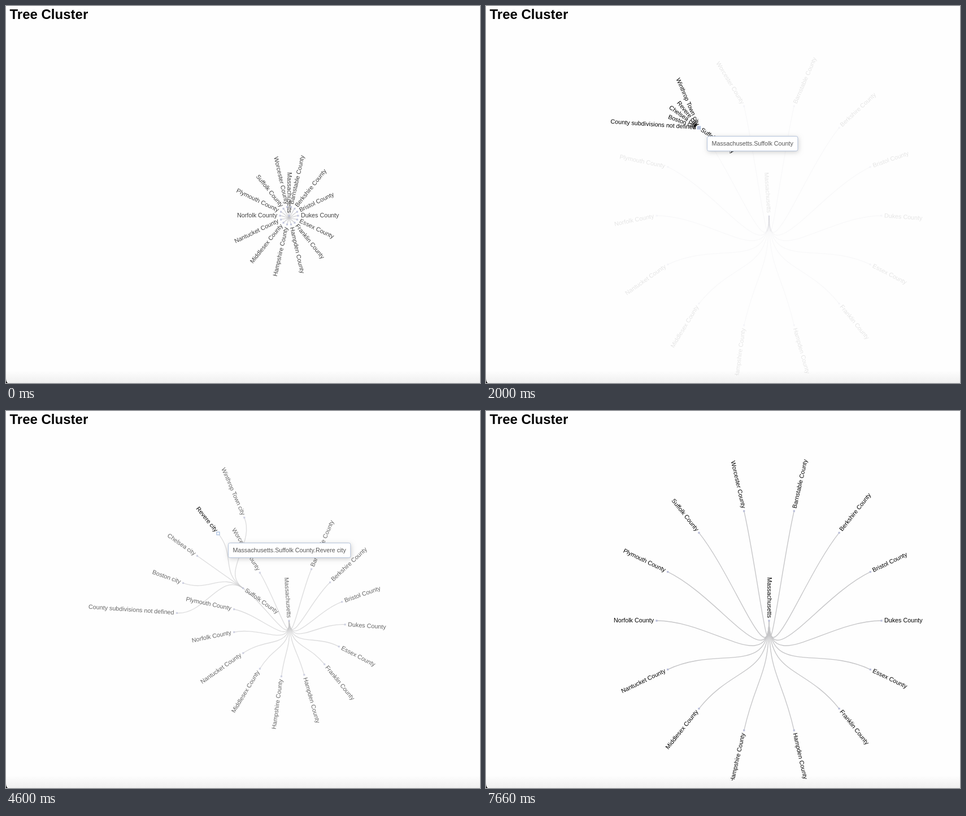
Write an HTML page with a canvas that moves like this. It is 839x667 px and loops after 7.73 s.

```html
<!DOCTYPE html>
<html lang="en">
<head>
<meta charset="utf-8">
<title>Tree Cluster</title>
<style>
  html, body { margin: 0; width: 100%; height: 100%; overflow: hidden; background: #fefefe; }
  canvas { display: block; }
</style>
</head>
<body>
<canvas id="stage" width="839" height="667"></canvas>
<script>
const ctx = document.getElementById('stage').getContext('2d');
const W = 839, H = 667, LOOP = 7730;
const FONT = '10.75px "Liberation Sans", Arial, sans-serif';
const CX = 501, CY = 371, RADIUS = 199;
const MOVE = 1970, FADE = 790;
const GROW_AT = -534, OPEN_AT = 1980, CLOSE_AT = 5537;

const ROOT = 'Massachusetts', HUB = 'Suffolk County';
const counties = ['Barnstable', 'Berkshire', 'Bristol', 'Dukes', 'Essex', 'Franklin', 'Hampden',
  'Hampshire', 'Middlesex', 'Nantucket', 'Norfolk', 'Plymouth', 'Suffolk', 'Worcester']
  .map(name => name + ' County');
const cities = ['County subdivisions not defined', 'Boston city', 'Chelsea city', 'Revere city', 'Winthrop Town city'];
const hubIndex = counties.indexOf(HUB);

const hovers = [
  { node: '', start: -2000, end: -275 },
  { node: HUB, start: 1130, end: 2830 },
  { node: 'Revere city', start: 4460, end: 4780 },
  { node: HUB, start: 5150, end: 6100 }
];
const hubTip = `${ROOT}.${HUB}`;
const tips = [
  { text: hubTip, show: 930, hide: 2950, fadeIn: 150, fadeOut: 350, from: [380, 225], to: [391, 230], move: 1640, time: 160 },
  { text: hubTip + '.Revere city', show: 4230, hide: 5150, fadeIn: 200, fadeOut: 1, from: [393, 233], to: [393, 233], move: 0, time: 1 },
  { text: hubTip, show: 5150, hide: 6200, fadeIn: 1, fadeOut: 350, from: [393, 233], to: [435, 329], move: 5150, time: 400 }
];

const clamp = u => Math.max(0, Math.min(1, u));
const easeOut = u => 1 - (1 - clamp(u)) ** 3;
const easeInOut = u => (u = clamp(u)) < .5 ? 4 * u ** 3 : 1 - 4 * (1 - u) ** 3;
const mix = (a, b, k) => a.map((v, i) => v + (b[i] - v) * k);
const mixShape = (a, b, k) => a.map((p, i) => mix(p, b[i], k));
const rad = deg => deg * Math.PI / 180;

// Angles run clockwise from the top.
const polar = (deg, r) => [CX + r * Math.sin(rad(deg)), CY - r * Math.cos(rad(deg))];
const dot = p => [p, p, p, p];

function edge(a0, r0, a1, r1) {
  const mid = (r0 + r1) / 2;
  return [polar(a0, r0), polar(a0, mid), polar(a1, mid), polar(a1, r1)];
}

function makeLayout(open) {
  const pad = open ? 1 : .5;
  const step = 360 / (open ? 13 + 1 / 3 + 2 : 14);
  const r = open ? RADIUS / 2 : RADIUS;
  const rootAngle = (6.5 + pad) * step;
  const angles = counties.map((_, i) => (i + pad) * step);
  const hubAngle = angles[hubIndex];
  const cityAngles = cities.map((_, i) => hubAngle + (i - 2) * step * 2 / 3);
  return {
    open, rootAngle, angles, cityAngles,
    edges: angles.map(a => edge(rootAngle, 0, a, r)),
    cityEdges: cityAngles.map(a => open ? edge(hubAngle, r, a, RADIUS) : dot(polar(hubAngle, r)))
  };
}
const closed = makeLayout(false), opened = makeLayout(true);
const seed = { ...closed, edges: counties.map(() => dot([CX, CY])) };

function blurAlpha(t, node, parent) {
  let blur = 0;
  for (const h of hovers) {
    if (node === h.node || parent === h.node) continue;
    blur = Math.max(blur, easeOut((t - h.start) / FADE) * (1 - easeOut((t - h.end) / FADE)));
  }
  return 1 - .9 * blur;
}

function drawEdge([a, b, c, d], alpha) {
  ctx.globalAlpha = alpha;
  ctx.strokeStyle = '#c6c6c8';
  ctx.lineWidth = 1.35;
  ctx.beginPath();
  ctx.moveTo(...a);
  ctx.bezierCurveTo(...b, ...c, ...d);
  ctx.stroke();
}

function drawNode(name, [x, y], angle, alpha, { inward = false, hovered = false, hollow = false } = {}) {
  ctx.globalAlpha = alpha;
  if (hovered) {
    ctx.fillStyle = hollow ? '#fff' : '#b0c4de';
    ctx.strokeStyle = '#a9c0e0';
    ctx.lineWidth = 1.3;
    ctx.beginPath();
    ctx.rect(x - 2.5, y - 2.5, 5, 5);
    ctx.fill();
    ctx.stroke();
  } else {
    ctx.fillStyle = '#b9bdd8';
    ctx.fillRect(x - 1.6, y - 1.6, 3.2, 3.2);
  }
  const left = Math.sin(rad(angle)) < 0;
  const before = left !== inward;
  ctx.save();
  ctx.translate(x, y);
  ctx.rotate(rad(angle + (left ? 90 : -90)));
  ctx.fillStyle = '#000';
  ctx.textAlign = before ? 'right' : 'left';
  ctx.fillText(name, before ? -5 : 5, 0);
  ctx.restore();
}

function drawTree(t) {
  const [from, to, start] = t < OPEN_AT ? [seed, closed, GROW_AT]
    : t < CLOSE_AT ? [closed, opened, OPEN_AT] : [opened, closed, CLOSE_AT];
  const k = easeInOut((t - start) / MOVE);
  const edges = from.edges.map((e, i) => mixShape(e, to.edges[i], k));
  const hover = hovers.find(h => t >= h.start - 150 && t < h.end);
  const isHovered = name => !!hover && hover.node === name;

  ctx.font = FONT;
  ctx.textBaseline = 'middle';
  edges.forEach((e, i) => drawEdge(e, blurAlpha(t, ROOT)));

  const showCities = to.open || (from.open && k < 1);
  const cityFade = to.open ? 1 : 1 - k;
  const cityEdges = from.cityEdges.map((e, i) => mixShape(e, to.cityEdges[i], k));
  if (showCities) cityEdges.forEach(e => drawEdge(e, cityFade * blurAlpha(t, HUB)));

  drawNode(ROOT, [CX, CY], to.rootAngle + 179.99, blurAlpha(t, ROOT));
  counties.forEach((name, i) => {
    const expanded = to.open && name === HUB;
    drawNode(name, edges[i][3], to.angles[i], blurAlpha(t, name),
      { inward: expanded, hovered: isHovered(name), hollow: expanded });
  });
  if (showCities) cities.forEach((name, i) =>
    drawNode(name, cityEdges[i][3], opened.cityAngles[i], cityFade * blurAlpha(t, name, HUB),
      { hovered: isHovered(name), hollow: true }));
}

function drawTip(t, tip) {
  const alpha = Math.min(clamp((t - tip.show) / tip.fadeIn), clamp(1 - (t - tip.hide) / tip.fadeOut));
  if (!alpha) return;
  const [x, y] = mix(tip.from, tip.to, easeOut((t - tip.move) / tip.time));
  ctx.save();
  ctx.globalAlpha = alpha;
  ctx.font = FONT;
  ctx.textAlign = 'left';
  ctx.textBaseline = 'middle';
  ctx.beginPath();
  ctx.roundRect(x + .5, y + .5, ctx.measureText(tip.text).width + 16, 26, 3);
  ctx.shadowColor = 'rgba(0,0,0,.2)';
  ctx.shadowBlur = 9;
  ctx.shadowOffsetX = 1;
  ctx.shadowOffsetY = 2;
  ctx.fillStyle = '#fff';
  ctx.fill();
  ctx.shadowColor = 'transparent';
  ctx.strokeStyle = '#b4c3da';
  ctx.lineWidth = 1;
  ctx.stroke();
  ctx.fillStyle = '#555';
  ctx.fillText(tip.text, x + 8.5, y + 14);
  ctx.restore();
}

function drawPage() {
  ctx.globalAlpha = 1;
  ctx.fillStyle = '#fefefe';
  ctx.fillRect(0, 0, W, H);
  const shade = ctx.createLinearGradient(0, 645, 0, H);
  shade.addColorStop(0, '#fefefe');
  shade.addColorStop(1, '#efefef');
  ctx.fillStyle = shade;
  ctx.fillRect(0, 645, W, 22);
  ctx.fillStyle = '#000';
  ctx.beginPath();
  ctx.moveTo(0, 659);
  ctx.quadraticCurveTo(0, 665, 3, H);
  ctx.lineTo(0, H);
  ctx.fill();
  ctx.font = 'bold 24px "Liberation Sans", Arial, sans-serif';
  ctx.textAlign = 'left';
  ctx.textBaseline = 'alphabetic';
  ctx.fillText('Tree Cluster', 6.5, 23);
}

function frame() {
  const t = performance.now() % LOOP;
  drawPage();
  ctx.save();
  ctx.beginPath();
  ctx.rect(0, 0, W, 654);
  ctx.clip();
  drawTree(t);
  ctx.restore();
  tips.forEach(tip => drawTip(t, tip));
  requestAnimationFrame(frame);
}
frame();
</script>
</body>
</html>
```
